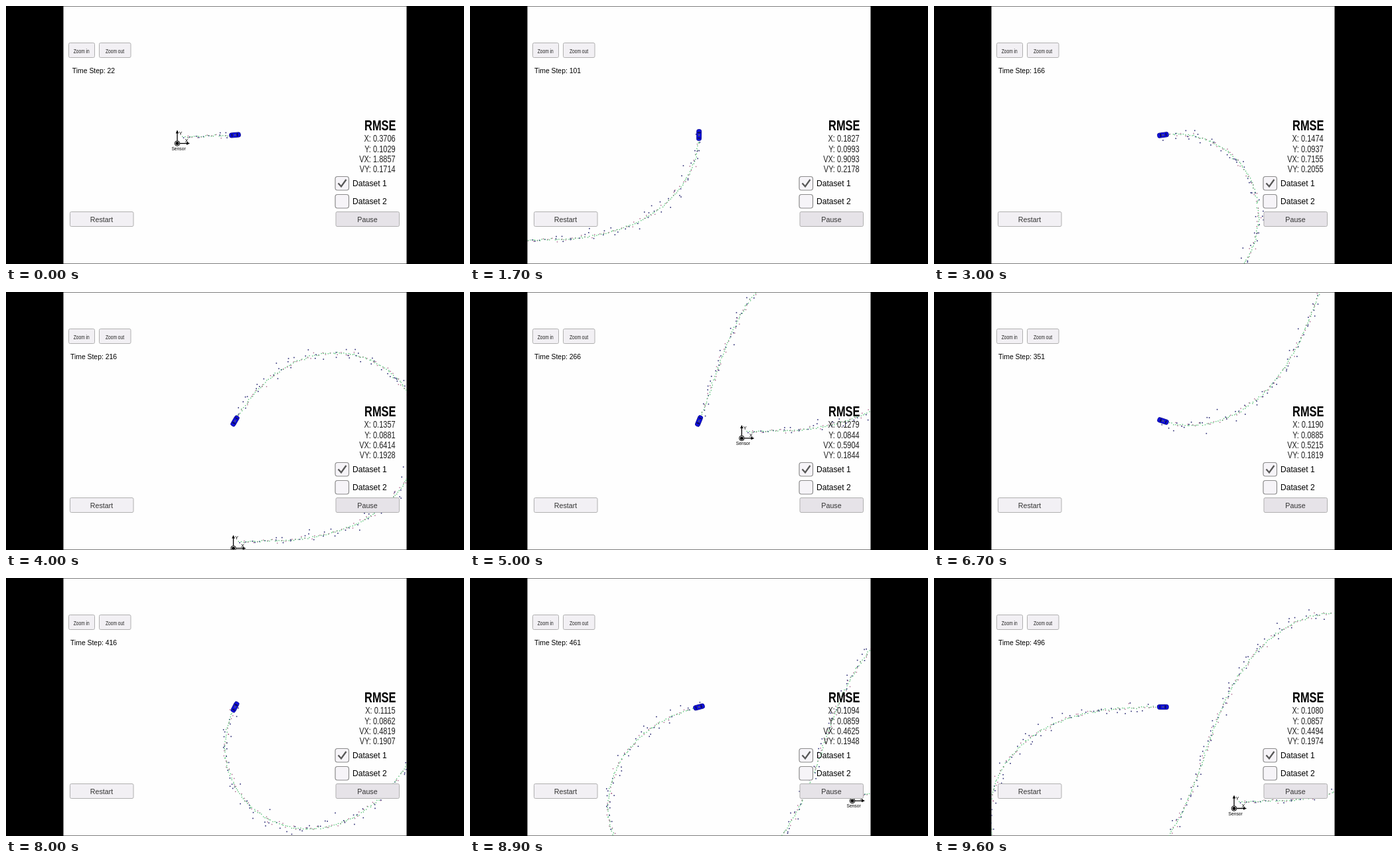
Recreate the animation shown at these times as an HTML page with a canvas. Size 690 by 388 pixels, loop 9700 ms.

```html
<!DOCTYPE html>
<html lang="en">
<head>
<meta charset="utf-8">
<title>Sensor fusion tracking</title>
<style>
  html, body { margin: 0; width: 100%; height: 100%; overflow: hidden; background: #000; }
  canvas { display: block; }
</style>
</head>
<body>
<canvas id="stage" width="690" height="388"></canvas>
<script>
const ctx = document.getElementById('stage').getContext('2d');
const LOOP = 9700, TICK = 100, SCALE = 13.8;
const CAR = { x: 345, y: 194 };
const SANS = '"Liberation Sans", Arial, sans-serif';

// Seeded Gaussian noise
let seed = 7;
function random() {
  seed = (seed * 16807) % 2147483647;
  return seed / 2147483647;
}
function gauss(sigma) {
  return sigma * Math.sqrt(-2 * Math.log(random())) * Math.cos(2 * Math.PI * random());
}

// Vehicle with sinusoidal yaw rate and speed, one measurement per step
function simulate(count) {
  const dt = 0.05, omega = 2 * Math.PI / 500, track = [];
  let x = 0.6, y = 0.6, yaw = 0;
  for (let i = 0; i < count; i++) {
    const rate = 0.55 * Math.sin(omega * (i + 1));
    const speed = 5 + 0.2 * Math.cos(2 * omega * (i + 1));
    const radar = i % 2 === 1;
    let mx, my;
    if (radar) {
      const range = Math.hypot(x, y) + gauss(0.3), bearing = Math.atan2(y, x) + gauss(0.03);
      mx = range * Math.cos(bearing);
      my = range * Math.sin(bearing);
    } else {
      mx = x + gauss(0.15);
      my = y + gauss(0.15);
    }
    track.push({ x, y, yaw, radar, mx, my, ex: x + gauss(0.05), ey: y + gauss(0.05) });
    const mid = yaw + rate * dt / 2;
    x += speed * dt * Math.cos(mid);
    y += speed * dt * Math.sin(mid);
    yaw += rate * dt;
  }
  return track;
}
const track = simulate(500);

// Error readings at a few steps; squared sums are interpolated between them
const knots = [22, 101, 166, 266, 351, 416, 496];
const errors = {
  X: [0.3706, 0.1827, 0.1474, 0.1279, 0.1190, 0.1115, 0.1080],
  Y: [0.1029, 0.0993, 0.0937, 0.0844, 0.0885, 0.0862, 0.0857],
  VX: [1.8857, 0.9093, 0.7155, 0.5904, 0.5215, 0.4819, 0.4494],
  VY: [0.1714, 0.2178, 0.2055, 0.1844, 0.1819, 0.1907, 0.1974]
};
function rmse(values, step) {
  let k = 0;
  while (k < knots.length - 2 && step > knots[k + 1]) k++;
  const sum = j => knots[j] * values[j] ** 2;
  const f = (step - knots[k]) / (knots[k + 1] - knots[k]);
  return Math.sqrt((sum(k) + (sum(k + 1) - sum(k)) * f) / step).toFixed(4);
}

function text(str, x, y, size, { align = 'center', color = '#000', weight = '', condense = 1 } = {}) {
  ctx.save();
  ctx.translate(x, y);
  ctx.scale(condense, 1);
  ctx.font = `${weight} ${size}px ${SANS}`;
  ctx.textAlign = align;
  ctx.fillStyle = color;
  ctx.fillText(str, 0, 0);
  ctx.restore();
}

function box(x, y, w, h, r, fill, stroke, width = 1) {
  ctx.beginPath();
  ctx.roundRect(x, y, w, h, r);
  ctx.fillStyle = fill;
  ctx.fill();
  if (!stroke) return;
  ctx.strokeStyle = stroke;
  ctx.lineWidth = width;
  ctx.stroke();
}

function dot(x, y, size, color) {
  ctx.fillStyle = color;
  ctx.fillRect(x - size / 2, y - size / 2, size, size);
}

function line(color, width, ...points) {
  ctx.beginPath();
  for (const [x, y] of points) ctx.lineTo(x, y);
  ctx.strokeStyle = color;
  ctx.lineWidth = width;
  ctx.stroke();
}

function triangle(...points) {
  ctx.beginPath();
  for (const [x, y] of points) ctx.lineTo(x, y);
  ctx.fillStyle = '#000';
  ctx.fill();
}

function drawSensor(x, y) {
  ctx.save();
  ctx.translate(x, y);
  line('#000', 1.3, [0, -3], [0, -16]);
  line('#000', 1.3, [3, 0], [15, 0]);
  triangle([-2.3, -15], [2.3, -15], [0, -20]);
  triangle([14, -2.3], [14, 2.3], [19, 0]);
  ctx.beginPath();
  ctx.arc(0, 0, 3.8, 0, 7);
  ctx.fillStyle = '#fff';
  ctx.fill();
  ctx.lineWidth = 1;
  ctx.stroke();
  ctx.beginPath();
  ctx.arc(0, 0, 2.5, 0, 7);
  ctx.fillStyle = '#000';
  ctx.fill();
  text('Y', 5, -13, 7.5);
  text('X', 14, -1.5, 7.5);
  text('Sensor', 2, 10, 6.7);
  ctx.restore();
}

function drawTrail(step, ox, oy) {
  const px = x => ox + x * SCALE, py = y => oy - 2 - y * SCALE;
  for (let i = 0; i <= step; i++) {
    const p = track[i];
    dot(px(p.mx), py(p.my), p.radar ? 1.6 : 1.4, p.radar ? '#2c2c74' : '#a86088');
    dot(px(p.ex), py(p.ey), 1.35, '#50c070');
  }
}

function drawCar(yaw) {
  ctx.save();
  ctx.translate(CAR.x, CAR.y);
  ctx.rotate(-yaw);
  box(-8.4, -3.6, 16.8, 7.2, 2.8, '#1010dc', '#080890', 0.8);
  box(-5.5, -2.4, 1.8, 4.8, 1, '#0c0c58');
  box(2.6, -2.6, 2.1, 5.2, 1, '#0c0c58');
  box(-1.2, -1.1, 2.4, 2.2, 1, '#5c5c6c');
  ctx.restore();
}

function drawCheckbox(y, label, checked) {
  box(496, y, 20.5, 20.5, 3.5, '#f6f4f8', '#8c8c8c', 1.2);
  if (checked) line('#585858', 2.3, [500.5, 266.5], [505, 271.5], [512.5, 261]);
  text(label, 522, y + 14.2, 12.1, { align: 'left' });
}

function drawPanel(step) {
  const small = { color: '#222', condense: 0.68 };
  const label = { color: '#333' };
  const button = '#f2f0f4', edge = '#b0b0b0';
  box(94.5, 55.5, 39, 22, 2, button, edge);
  box(140.5, 55.5, 47.5, 22, 2, button, edge);
  text('Zoom in', 113.7, 70.5, 9.8, small);
  text('Zoom out', 164, 70.5, 9.8, small);
  text('Time Step: ' + step, 132, 100.5, 10.4);

  text('RMSE', 587.5, 187.3, 22.5, { align: 'right', weight: 'bold', condense: 0.73 });
  Object.entries(errors).forEach(([name, values], row) => {
    text(`${name}: ${rmse(values, step)}`, 586.7, 204.2 + row * 15.4, 14.5,
      { align: 'right', color: '#222', condense: 0.76 });
  });

  drawCheckbox(256.5, 'Dataset 1', true);
  drawCheckbox(283.5, 'Dataset 2', false);
  box(96.5, 309.5, 95.5, 22, 2, button, edge);
  box(497, 309.5, 95.5, 22, 2, '#e6e3e8', edge);
  text('Restart', 144, 324.5, 10.7, label);
  text('Pause', 544.5, 324.5, 10.7, label);
}

function draw(now) {
  const tick = Math.floor((now % LOOP) / TICK);
  const step = Math.max(22 + tick, 16 + 5 * tick);
  const car = track[step];
  const ox = CAR.x - car.x * SCALE, oy = CAR.y + 2 + car.y * SCALE;

  ctx.fillStyle = '#000';
  ctx.fillRect(0, 0, 690, 388);
  ctx.save();
  ctx.beginPath();
  ctx.rect(86.5, 0.4, 517, 387.2);
  ctx.clip();
  ctx.fillStyle = '#fefefe';
  ctx.fillRect(86, 0, 518, 388);
  drawSensor(ox, oy);
  drawTrail(step, ox, oy);
  drawCar(car.yaw);
  drawPanel(step);
  ctx.restore();
}

let start;
function frame(now) {
  start ??= now;
  draw(now - start);
  requestAnimationFrame(frame);
}
requestAnimationFrame(frame);
</script>
</body>
</html>
```
